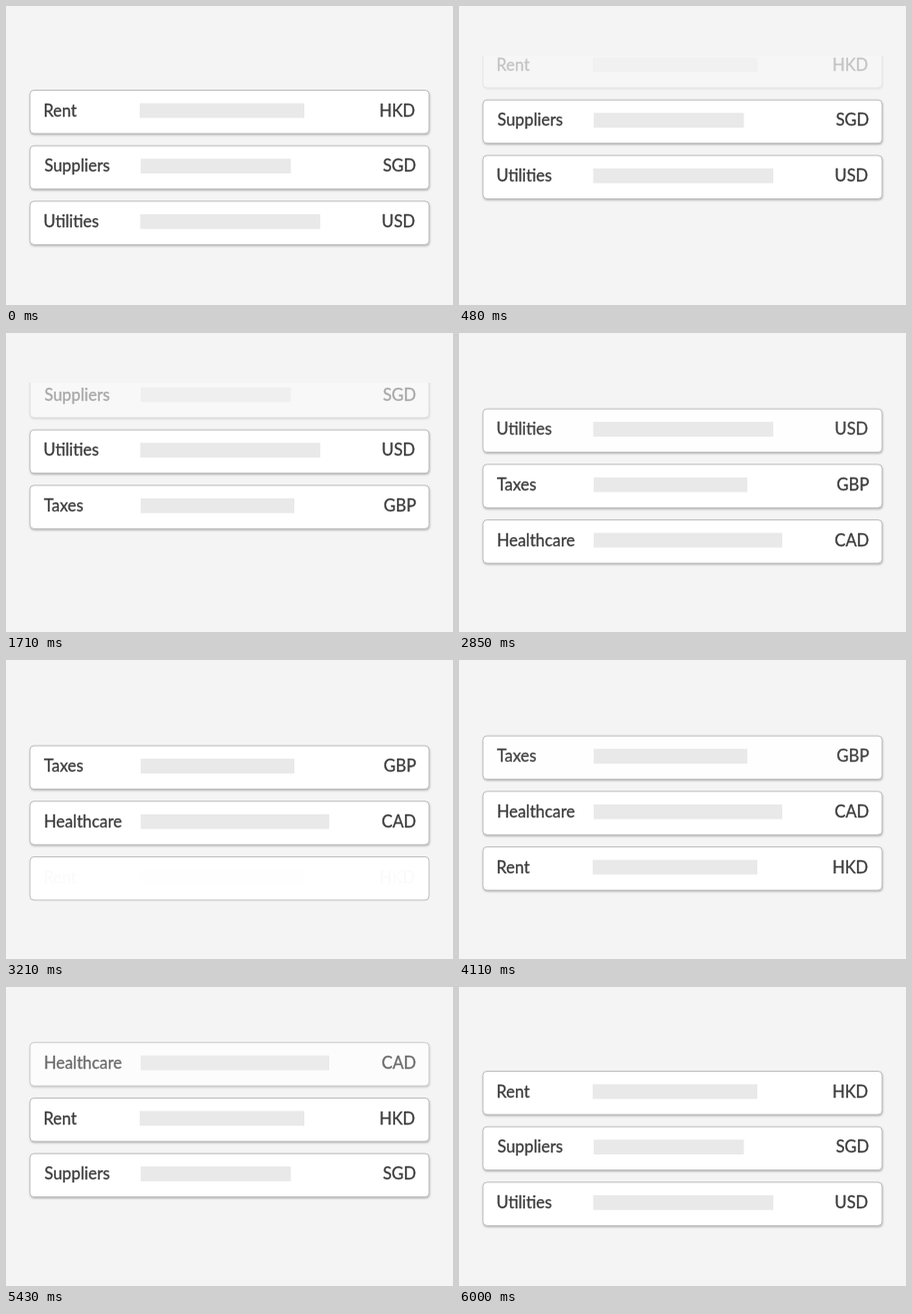
These frames come from a looping animation (448 px wide and 300 px high, 6330 ms). An HTML page:

```html
<!DOCTYPE html>
<html lang="en">
<head>
<meta charset="utf-8">
<title>Payment list</title>
<style>
  html, body { margin: 0; width: 100%; height: 100%; overflow: hidden; background: #f4f4f4; }
  svg { display: block; width: 448px; height: 300px; }
  text { font: 400 16.4px Lato, "Open Sans", sans-serif; fill: #3b3b3b; stroke: #3b3b3b; stroke-width: .3px; }
  .right { text-anchor: end; }
  .face { fill: #fff; stroke: #bdbdbd; stroke-width: 1; }
  .shadow { fill: #000; fill-opacity: .3; filter: blur(1.2px); }
  .bar { fill: #e9e9e9; }
</style>
</head>
<body>
<svg viewBox="0 0 448 300">
  <defs><clipPath id="view"><rect y="50" width="448" height="195"/></clipPath></defs>
  <g id="list" clip-path="url(#view)"></g>
</svg>
<script>
  const LOOP = 6330, FIRST = 300, STEP = 1260, MOVE = 660, TICK = 30;
  const TOP = 84.5, PITCH = 55.7, COUNT = 5;

  // label, currency, left edge of label, right edge of currency, bar start, bar width
  const items = [
    ["Rent", "HKD", 37.5, 410, 134, 165],
    ["Suppliers", "SGD", 38.5, 411, 135, 150.5],
    ["Utilities", "USD", 37.5, 410, 134.5, 180.5],
    ["Taxes", "GBP", 38, 411, 135, 154],
    ["Healthcare", "CAD", 38, 411, 135, 189]
  ];

  const list = document.getElementById("list");

  function add(parent, tag, attrs, text) {
    const el = document.createElementNS("http://www.w3.org/2000/svg", tag);
    for (const key in attrs) el.setAttribute(key, attrs[key]);
    if (text) el.textContent = text;
    parent.append(el);
    return el;
  }

  function makeCard([label, code, left, right, barX, barW]) {
    const root = add(list, "g", {});
    const shadow = add(root, "rect", { class: "shadow", x: 24.5, y: 1.3, width: 400, height: 43.5, rx: 4 });
    add(root, "rect", { class: "face", x: 24, y: 0, width: 400, height: 43.5, rx: 4 });
    const content = add(root, "g", {});
    add(content, "text", { x: left, y: 26.2 }, label);
    add(content, "rect", { class: "bar", x: barX, y: 13, width: barW, height: 14.8 });
    add(content, "text", { class: "right", x: right, y: 26.2 }, code);
    return { root, shadow, content };
  }

  const cards = items.map(makeCard);

  function smooth(a, b, t) {
    const u = Math.min(1, Math.max(0, (t - a) / (b - a)));
    return u * u * (3 - 2 * u);
  }

  // quick start, then a long settling tail
  function glide(t) {
    if (t >= MOVE) return 1;
    if (t < 150) {
      const u = t / 150;
      return u * (0.62 + 0.776 * u - 0.624 * u * u);
    }
    return 1 - 0.228 * Math.exp((150 - t) / 114);
  }

  function draw(time) {
    const t = time - FIRST;
    const step = Math.min(COUNT - 1, Math.max(0, Math.floor(t / STEP)));
    const local = Math.max(0, t - step * STEP);
    const shift = glide(local);

    cards.forEach(({ root, shadow, content }, i) => {
      const slot = (i - step + COUNT) % COUNT;
      let alpha = 1, detail = 1;
      if (slot === 0) alpha = 1 - smooth(0, 270, local);
      if (slot === 3) {
        alpha = smooth(270, 350, local);
        detail = smooth(370, 600, local);
      }
      if (slot > 3) alpha = 0;
      root.setAttribute("transform", `translate(0 ${(TOP + (slot - shift) * PITCH).toFixed(2)})`);
      root.setAttribute("opacity", alpha);
      shadow.setAttribute("opacity", detail);
      content.setAttribute("opacity", detail);
    });
  }

  const start = performance.now();

  function frame() {
    const time = (performance.now() - start) % LOOP;
    draw(Math.floor((time + 5) / TICK) * TICK);
    requestAnimationFrame(frame);
  }

  draw(0);
  requestAnimationFrame(frame);
</script>
</body>
</html>
```
